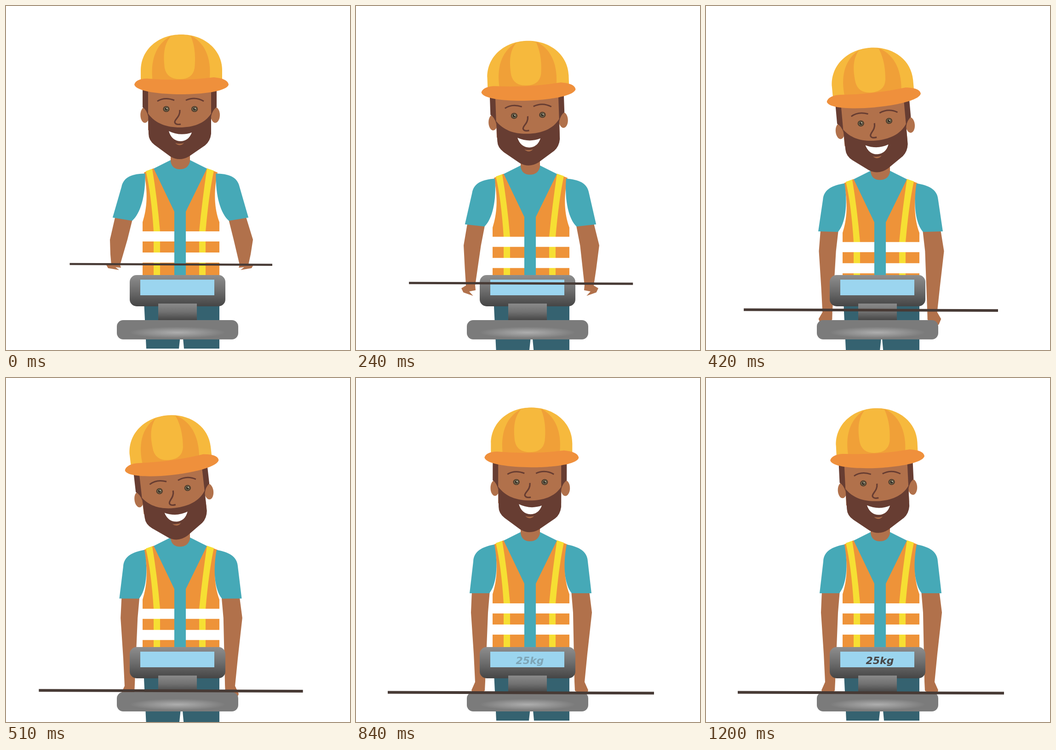
An HTML page with a canvas for the animation above (1230 ms loop, 748x748 px).

```html
<!DOCTYPE html>
<html lang="en">
<head>
<meta charset="utf-8">
<title>Worker and scale</title>
<style>
html, body { margin: 0; width: 100%; height: 100%; overflow: hidden; background: #fff; }
canvas { display: block; filter: blur(0.7px); }
</style>
</head>
<body>
<canvas id="stage" width="748" height="748"></canvas>
<script>
const ctx = document.getElementById('stage').getContext('2d');
const SKIN = '#b1714b', BEARD = '#673d32', TEAL = '#46a9b7', ORANGE = '#ee9339',
      YELLOW = '#f6df33', PANTS = '#356270', BAR = '#473a35';

const mix = (a, b, p) => a + (b - a) * p;
const ease = (t, from, to) => {
  const p = Math.min(1, Math.max(0, (t - from) / (to - from)));
  return p * p * (3 - 2 * p);
};
// Eased interpolation through [step, value] keys.
function track(step, keys) {
  let value = keys[0][1];
  for (let i = 1; i < keys.length && step > keys[i - 1][0]; i++)
    value = mix(keys[i - 1][1], keys[i][1], ease(step, keys[i - 1][0], keys[i][0]));
  return value;
}

function fill(d, color) {
  ctx.fillStyle = color;
  ctx.fill(new Path2D(d));
}
function stroke(d, color, width) {
  ctx.strokeStyle = color;
  ctx.lineWidth = width;
  ctx.stroke(new Path2D(d));
}
function oval(x, y, rx, ry, color) {
  ctx.fillStyle = color;
  ctx.beginPath();
  ctx.ellipse(x, y, rx, ry, 0, 0, 7);
  ctx.fill();
}
function box(x, y, w, h, r, color) {
  ctx.fillStyle = color;
  ctx.beginPath();
  ctx.roundRect(x, y, w, h, r);
  ctx.fill();
}
function shade(gradient, ...colors) {
  colors.forEach((c, i) => gradient.addColorStop(i / (colors.length - 1), c));
  return gradient;
}
function group(draw) {
  ctx.save();
  draw();
  ctx.restore();
}

// Forearm outline as [raised x, y, lowered x, y], from sleeve to hand and back.
const ARM = [
  [238, 456, 252, 462], [226, 508, 250, 510], [227, 540, 256, 600], [229, 563, 259, 661],
  [218, 563, 251, 679], [222, 570, 256, 692], [246, 574, 272, 706], [238, 568, 262, 690],
  [250, 569, 280, 680], [248, 563, 281, 660], [264, 508, 287, 510], [276, 460, 291, 462]
];

function arm(p, right) {
  group(() => {
    if (right) ctx.transform(-1, 0, 0, 1, 759, 0);
    ctx.beginPath();
    ARM.forEach(([ax, ay, bx, by], i) => {
      const shift = !right ? 0 : i === 1 ? -4 : i > 2 && i < 10 ? 3 : 0;
      ctx.lineTo(mix(ax, bx, p) + shift, mix(ay, by, p));
    });
    ctx.fillStyle = SKIN;
    ctx.fill();
    ctx.translate(288, 373);
    ctx.rotate(mix(9.5, 0, p) * Math.PI / 180);
    ctx.translate(-288, -373);
    fill('M301 362C275 367 256 376 255 399L247 468H290C305 450 310 410 301 362Z', TEAL);
  });
}

function torso() {
  fill('M298 600H464V745H387L382 690L376 745H305Z', PANTS);
  fill('M358 335L320 354L362 450V610H395V450L438 354L400 335Z', TEAL);
  fill('M358 318V338Q361 355 378 355Q396 355 400 338V318Z', SKIN);
  fill('M321 353L300 362C309 405 307 440 297 470V610H366V447Z', ORANGE);
  fill('M437 353L460 362C451 405 453 440 464 470V610H391V447Z', ORANGE);
  fill('M304 359L318 354Q329 420 335 490V610H321V490Q316 410 304 359Z', YELLOW);
  fill('M452 358L437 353Q427 420 420 490V610H434V490Q441 410 452 358Z', YELLOW);
  for (const y of [490, 536]) {
    box(296, y, 70, 22, 0, '#fff');
    box(391, y, 74, 22, 0, '#fff');
  }
}

function eye(x) {
  oval(x, 224, 7.2, 6.6, '#54402f');
  oval(x, 224, 4.6, 4.3, '#7f795c');
  oval(x, 224, 3, 3, '#302922');
  oval(x + 1.3, 223, 1.2, 1.2, '#e6e2cf');
}

function head() {
  oval(302, 237, 9.7, 17, SKIN);
  oval(455, 237, 10, 17, SKIN);
  fill('M297 182H458V220Q449 226 446 240H309Q306 226 297 220Z', BEARD);
  fill('M309 180H446V270H309Z', SKIN);
  fill('M309 234C325 256 350 264 378 264S432 256 446 234V278Q444 294 433 303L398 327Q377 339 357 327L323 302Q310 292 310 278Z', BEARD);
  fill('M354 272Q379 284 404 275Q397 294 379 294Q360 293 354 272Z', '#fff');
  fill('M368 298Q378 301 387 298Q378 307 368 298Z', SKIN);
  stroke('M378 226C379 242 366 246 367 253Q369 259 380 257', BEARD, 3.2);
  stroke('M329 207Q345 197 366 205M391 205Q411 196 430 207', BEARD, 3);
  eye(348.5);
  eye(410);
  fill('M293 165V140C293 95 331 62 381 62S470 95 470 140V165Z', '#f6b93d');
  fill('M319 165C313 120 325 84 357 66Q381 59 405 66C436 84 448 120 442 165Z', '#f0a038');
  fill('M358 66Q381 59 402 66C412 90 412 115 410 135Q406 159 378 159T345 135C342 110 342 85 358 66Z', '#f6b93d');
  fill('M279 171C281 162 294 157 310 158Q381 164 452 155C472 157 483 162 484 171C480 186 425 192 381 192S283 186 279 171Z', '#ef903c');
}

function scale(textAlpha) {
  const down = (y, h) => ctx.createLinearGradient(0, y, 0, y + h);
  box(269, 585, 208, 68, 15, shade(down(585, 68), '#8e8e8e', '#6d6d6d', '#454545'));
  box(292, 595, 161, 34, 0, '#9bd5ef');
  box(331, 647, 84, 37, 0, shade(down(647, 37), '#8a8a8a', '#707070', '#444'));
  box(241, 683, 264, 42, 14, '#7b7b7b');
  group(() => {
    ctx.translate(373, 710);
    ctx.scale(1, 0.12);
    oval(0, 0, 105, 105, shade(ctx.createRadialGradient(0, 0, 0, 0, 0, 105), '#aeaeae', '#959595', '#7b7b7b'));
  });
  group(() => {
    ctx.globalAlpha = textAlpha;
    ctx.font = 'italic bold 22px "DejaVu Sans", sans-serif';
    ctx.textAlign = 'center';
    ctx.fillStyle = '#484646';
    ctx.fillText('25kg', 378, 621.5);
  });
}

function draw(step) {
  const lower = ease(step, 0, 18);
  ctx.fillStyle = '#fff';
  ctx.fillRect(0, 0, 748, 748);
  group(() => {
    ctx.translate(0, track(step, [[0, 0], [14, 23.6], [18, 0]]));
    torso();
    arm(lower, false);
    arm(lower, true);
    ctx.translate(378, 356 + track(step, [[0, 0], [20.5, 7], [31, 0], [41, 4]]));
    ctx.rotate(track(step, [[0, 0], [20.5, -7.4], [31, 3.7], [41, -3.5]]) * Math.PI / 180);
    ctx.translate(-378, -356);
    head();
  });
  scale(ease(step, 20, 38));
  const y = mix(561, 683.5, lower);
  stroke(`M${mix(138.5, 69, lower)} ${y}L${mix(579, 648, lower)} ${y + 1.8}`, BAR, mix(4.6, 6, lower));
}

// Steps of 30 ms; the first one is held twice as long.
function tick(now) {
  draw(Math.max(0, Math.floor((now % 1230) / 30) - 1));
  requestAnimationFrame(tick);
}
requestAnimationFrame(tick);
</script>
</body>
</html>
```
